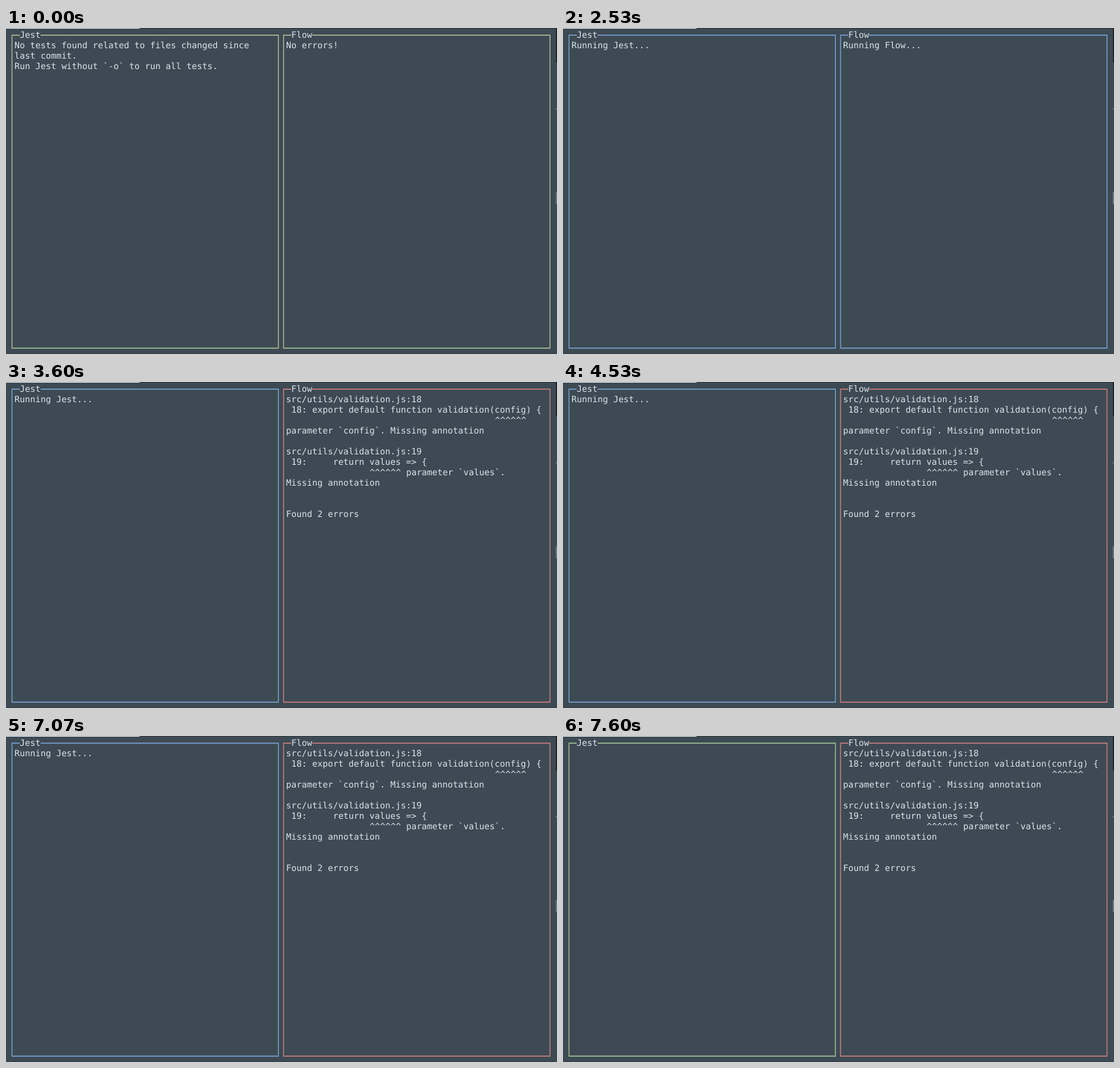
An HTML page for the animation above (8 s loop, 844 px wide and 500 px high).

```html
<!DOCTYPE html>
<html lang="en">
<head>
<meta charset="utf-8">
<title>Test dashboard</title>
<style>
  html, body { margin: 0; width: 100%; height: 100%; overflow: hidden; background: #3e4a53; }
  svg { display: block; }
  text {
    font: 13.288px "DejaVu Sans Mono", monospace;
    fill: #d9e4ea;
    white-space: pre;
    text-rendering: geometricPrecision;
  }
  path { fill: none; stroke-width: 1.3; }
</style>
</head>
<body>
<svg width="844" height="500" viewBox="0 0 844 500">
  <rect width="844" height="1" fill="#2c353b"/>
  <rect width="204.5" height="1" fill="#e9edef"/>
  <rect y="499" width="844" height="1" fill="#343f47"/>
  <rect x="842.5" width="1.5" height="53" fill="#161a1d"/>
  <rect x="842" y="123" width="2" height="2" fill="#65727b"/>
  <rect x="842" y="252" width="2" height="18" fill="#68747c"/>
  <g id="panels"></g>
</svg>
<script>
const CELL = 8, ROW = 16, LOOP = 8000;
const GREEN = "#a5c79b", BLUE = "#7ba5d8", RED = "#cf8380";

const flowErrors = `src/utils/validation.js:18
 18: export default function validation(config) {
${" ".repeat(40)}^^^^^^
parameter \`config\`. Missing annotation

src/utils/validation.js:19
 19:     return values => {
${" ".repeat(16)}^^^^^^ parameter \`values\`.
Missing annotation


Found 2 errors`;

// Each state: start time, border colour, content
const panels = [
  { x: 9, title: "Jest", states: [
    [0, GREEN, "No tests found related to files changed since\nlast commit.\nRun Jest without `-o` to run all tests."],
    [2530, BLUE, "Running Jest..."],
    [7330, GREEN, ""],
  ] },
  { x: 425, title: "Flow", states: [
    [0, GREEN, "No errors!"],
    [2530, BLUE, "Running Flow..."],
    [2870, RED, flowErrors],
  ] },
];

function add(parent, tag, attrs, content = "") {
  const el = document.createElementNS("http://www.w3.org/2000/svg", tag);
  for (const key in attrs) el.setAttribute(key, attrs[key]);
  el.textContent = content;
  return parent.appendChild(el);
}

const root = document.getElementById("panels");
for (const panel of panels) {
  const { x, title } = panel;
  const left = x + 12, right = left + title.length * CELL;
  panel.border = add(root, "path", { d: `M${right} 11H${x + 408.3}V491H${x + 0.2}V11H${left}` });
  add(root, "text", { x: left, y: 15 }, title);
  panel.body = add(root, "g", {});
}

function show(panel, state) {
  if (panel.state === state) return;
  panel.state = state;
  const [, color, content] = state;
  panel.border.setAttribute("stroke", color);
  panel.body.textContent = "";
  content.split("\n").forEach((line, row) => {
    const indent = line.search(/\S|$/);
    add(panel.body, "text", { x: panel.x + 4 + indent * CELL, y: 31 + row * ROW }, line.trim());
  });
}

function draw(now) {
  const time = now % LOOP;
  for (const panel of panels) {
    show(panel, panel.states.filter(([start]) => start <= time).pop());
  }
}

const origin = performance.now();
function frame() {
  draw(performance.now() - origin);
  requestAnimationFrame(frame);
}
frame();
</script>
</body>
</html>
```
